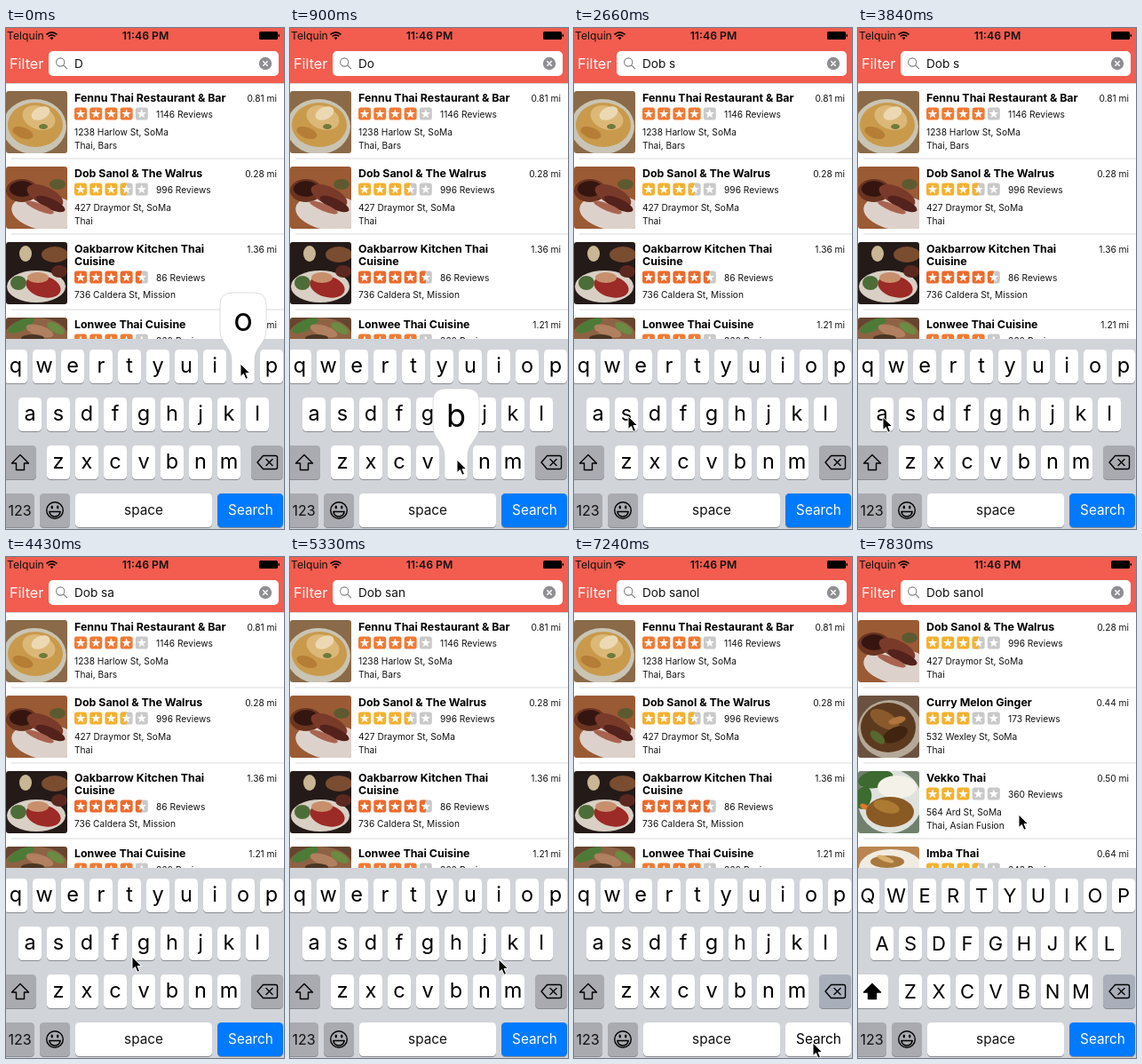
Recreate the animation shown at these times as an HTML page. Size 313 by 564 pixels, loop 8 s.

```html
<!DOCTYPE html>
<html lang="en">
<head>
<meta charset="utf-8">
<title>Restaurant search</title>
<style>
  html, body { margin: 0; width: 100%; height: 100%; overflow: hidden; background: #fff; }
  svg { display: block; }
  text { font-family: Inter, Roboto, "Liberation Sans", sans-serif; font-size: 10.2px; fill: #111; white-space: pre; }
  .mid { text-anchor: middle; }
  .end { text-anchor: end; }
  .name { font-size: 12.4px; font-weight: 700; fill: #000; }
  .lower { font-size: 23.5px; fill: #000; }
  .upper { font-size: 22px; fill: #000; }
  .big { font-size: 36px; fill: #000; }
  .label { font-size: 15.3px; }
  .key { fill: #fff; }
  .gray { fill: #a9abb0; }
  .line { fill: none; stroke: #000; stroke-width: 1.4; stroke-linejoin: round; stroke-linecap: round; }
</style>
</head>
<body>
<svg id="stage" width="313" height="564" viewBox="0 0 313 564"></svg>
<script>
const stage = document.getElementById('stage');
const $ = id => document.getElementById(id);

const text = (x, y, s, cls = '', more = '') =>
  `<text x="${x}" y="${y}" class="${cls}" ${more}>${s.replace('&', '&amp;')}</text>`;
const rect = (x, y, w, h, r, more = '') =>
  `<rect x="${x}" y="${y}" width="${w}" height="${h}" rx="${r}" ${more}/>`;
const oval = (fill, x, y, rx, ry, turn = 0) =>
  `<ellipse cx="${x}" cy="${y}" rx="${rx}" ry="${ry}" fill="${fill}" transform="rotate(${turn} ${x} ${y})"/>`;

// Dishes: table colour followed by a few ovals
const dishes = {
  soup: ['#8a6a48', ['#c9c4b4', 32, 40, 36, 31], ['#c99a4c', 33, 38, 31, 25], ['#dcb878', 37, 30, 19, 13, 20],
    ['#ecd9b4', 39, 25, 11, 7, -25], ['#b57d35', 19, 47, 12, 6, 20], ['#6f7a3c', 42, 40, 5, 3]],
  beef: ['#9a5a34', ['#ddd2cb', 46, 52, 40, 20, 8], ['#6a3421', 18, 27, 18, 13], ['#351510', 18, 25, 14, 9],
    ['#7a3a2a', 44, 33, 22, 10, 25], ['#54221c', 50, 42, 18, 6, 25], ['#a86450', 38, 46, 17, 4, 22], ['#5d5a30', 58, 20, 9, 6]],
  feast: ['#241a18', ['#7a4c30', 55, 14, 15, 9], ['#c8b694', 22, 13, 7, 9], ['#d9cfc4', 34, 50, 33, 18],
    ['#9c2a26', 42, 50, 20, 12, 15], ['#c88f6c', 36, 40, 12, 6], ['#4d6d38', 14, 46, 9, 8], ['#5b2820', 60, 33, 9, 7]],
  greens: ['#66442f', ['#8e6244', 34, 22, 36, 22], ['#4d7a37', 17, 9, 16, 6, -25], ['#b08060', 38, 15, 16, 6, 18],
    ['#6b8a42', 56, 12, 11, 5, 30], ['#4b3523', 30, 23, 13, 4]],
  noodles: ['#6b5240', ['#b5a898', 36, 38, 36, 33], ['#5c3a20', 34, 36, 31, 28], ['#8a5a2c', 30, 27, 18, 9, 30],
    ['#40240f', 42, 44, 15, 8, -25], ['#56682f', 22, 47, 10, 5, 40], ['#b0743c', 44, 28, 10, 4, -15]],
  rice: ['#71806c', ['#dfe1dd', 36, 34, 36, 36], ['#3c6a30', 20, 9, 20, 10, -10], ['#f3f1e8', 44, 18, 22, 13],
    ['#3c6a30', 6, 30, 9, 13, 15], ['#d9792c', 7, 40, 5, 3, 25], ['#8a5a24', 36, 46, 27, 17], ['#ad7a34', 32, 40, 15, 7, 15]],
  plate: ['#b98450', ['#f1ece2', 37, 24, 36, 21], ['#a8783e', 33, 17, 19, 7], ['#d9b070', 31, 14, 10, 3, 20]]
};

const photo = (dish, y) => {
  const [table, ...parts] = dishes[dish];
  return `<g transform="translate(0 ${y})" clip-path="url(#photo)">` +
    rect(0, 0, 69, 70, 0, `fill="${table}"`) + parts.map(p => oval(...p)).join('') + '</g>';
};

const starPoints = Array.from({ length: 10 }, (_, i) => {
  const a = i * Math.PI / 5, r = i % 2 ? 2.3 : 5.5;
  return (r * Math.sin(a)).toFixed(2) + ',' + (-r * Math.cos(a)).toFixed(2);
}).join(' ');

const stars = (rating, y) => {
  const color = rating > 4 ? '#ed6a2c' : rating > 3.5 ? '#f07a34' : '#f4b130';
  let out = '';
  for (let i = 0; i < 5; i++) {
    const x = 77 + 17.2 * i, full = rating >= i + 1;
    out += rect(x, y, 14, 14, 2.8, `fill="${full ? color : '#c9c9c9'}"`);
    if (!full && rating > i)
      out += `<path d="M${x + 7} ${y}h-4.2q-2.800 0-2.800 2.800v8.400q0 2.800 2.800 2.800h4.200z" fill="${color}"/>`;
    out += `<polygon points="${starPoints}" fill="#fff" transform="translate(${x + 7} ${y + 7.3})"/>`;
  }
  return out;
};

const row = ([dish, name, miles, rating, reviews, street, kind], i) => {
  const top = 62 + 85 * i, lines = name.split('|'), shift = lines.length > 1 ? 14 : 0;
  return photo(dish, top + 9) +
    lines.map((s, n) => text(77, top + 20.5 + 14 * n, s, 'name')).join('') +
    text(305, top + 20.5, miles + ' mi', 'end') +
    stars(rating, top + 27.5 + shift) +
    text(169, top + 39 + shift, reviews + ' Reviews') +
    text(77, top + 58.5 + shift * 0.93, street) +
    (shift ? '' : text(77, top + 73.5, kind)) +
    rect(6, top + 84.5, 307, 1, 0, 'fill="#d9d9dc"');
};

const walrus = ['beef', 'Dob Sanol & The Walrus', '0.28', 3.5, 996, '427 Draymor St, SoMa', 'Thai'];
const before = [
  ['soup', 'Fennu Thai Restaurant & Bar', '0.81', 4, 1146, '1238 Harlow St, SoMa', 'Thai, Bars'],
  walrus,
  ['feast', 'Oakbarrow Kitchen Thai|Cuisine', '1.36', 4.5, 86, '736 Caldera St, Mission', ''],
  ['greens', 'Lonwee Thai Cuisine', '1.21', 4, 360, '', '']
];
const after = [
  walrus,
  ['noodles', 'Curry Melon Ginger', '0.44', 3, 173, '532 Wexley St, SoMa', 'Thai'],
  ['rice', 'Vekko Thai', '0.50', 3, 360, '564 Ard St, SoMa', 'Thai, Asian Fusion'],
  ['plate', 'Imba Thai', '0.64', 3.5, 343, '', '']
];

// Keyboard
const keys = {};
['qwertyuiop', 'asdfghjkl', 'zxcvbnm'].forEach((letters, r) =>
  [...letters].forEach((c, i) => keys[c] = { x: [11, 27, 59][r] + 32 * i, y: 362 + 54 * r }));

const cap = (x, y, w, cls, id = '') =>
  rect(x, y + 1, w, 38, 4.5, 'fill="#888b90"') + rect(x, y, w, 38, 4.5, `class="${cls}" id="${id}"`);
const letters = upper => Object.entries(keys).map(([c, k]) =>
  text(k.x, k.y + (upper ? 27 : 26), upper ? c.toUpperCase() : c, 'mid ' + (upper ? 'upper' : 'lower'))).join('');

const keyboard = rect(0, 350, 313, 214, 0, 'fill="#d1d4d9"') +
  Object.values(keys).map(k => cap(k.x - 13, k.y, 26, 'key')).join('') +
  cap(-6, 470, 40, 'gray', 'shift') + cap(276, 470, 36, 'gray', 'erase') +
  cap(-6, 524, 38, 'gray') + cap(38, 524, 34, 'gray') +
  cap(78, 524, 154, 'key', 'space') + cap(238, 524, 74, 'key', 'search') +
  `<g id="lower">${letters(false)}</g><g id="upper">${letters(true)}</g>` +
  '<path id="arrow" class="line" d="M16 480.5l9.5 9.5h-5v7.500h-9v-7.500h-5z"/>' +
  '<path class="line" d="M283 489l6.500-7.500h14q2 0 2 2v11q0 2-2 2h-14zM293 485.500l7 7m0-7l-7 7"/>' +
  '<circle class="line" cx="55" cy="543" r="9.300"/><path class="line" d="M48.800 544.500h12.400q-1 5.500-6.200 5.500t-6.200-5.500z"/>' +
  oval('#000', 51.8, 539.5, 1.2, 1.9) + oval('#000', 58.2, 539.5, 1.2, 1.9) +
  text(15.5, 549, '123', 'mid', 'style="font-size:16px"') +
  text(155, 547.5, 'space', 'mid label') + text(275.5, 547.5, 'Search', 'mid label', 'id="go"');

const header = rect(0, 0, 313, 62, 0, 'fill="#f25d4f"') + rect(0, 62, 313, 0.5, 0, 'fill-opacity="0.3"') +
  text(1, 12.8, 'Telquin', '', 'style="font-size:12.200px"') +
  '<path class="line" style="stroke-linecap:butt;stroke-width:1.600" d="M45.500 7.300q6-5 12 0M47.600 9.500q3.900-3.200 7.800 0"/>' +
  '<path d="M49.500 11q2-1.500 4 0l-2 2.200z"/>' +
  text(157, 12.8, '11:46 PM', 'mid', 'style="font-size:12.300px;font-weight:600"') +
  rect(285, 4, 21, 9, 1.5) + rect(306.5, 7, 1.5, 3, 0.7) +
  text(4, 46, 'Filter', '', 'style="font-size:16.200px;fill:#fff"') +
  rect(48, 26, 259, 28, 5, 'fill="#fff"') +
  '<path d="M64.800 42l4.200 4.200M65.800 38.500a4.600 4.600 0 1 1-9.200 0a4.600 4.600 0 1 1 9.200 0z" fill="none" stroke="#808085" stroke-width="1.100"/>' +
  text(77, 45, '', '', 'id="query" style="font-size:13.600px"') +
  '<circle cx="292" cy="40" r="7.200" fill="#8e8e93"/><path d="M289.300 37.300l5.400 5.400m0-5.400l-5.400 5.400" stroke="#fff" stroke-width="1.400"/>';

const bubble = '<g id="bubble"><path d="M-26-50q0-14 14-14h24q14 0 14 14v28c0 16-13 18-13 34v22q0 4-4 4h-18q-4 0-4-4v-22c0-16-13-18-13-34z" ' +
  'fill="#fff" stroke="#c4c6ca" stroke-width="0.600"/>' + text(0, -21, '', 'mid big', 'id="glyph"') + '</g>';

const cursor = '<path id="cursor" d="M0 0V14.500l3.400-3.100 2.500 5.900 2.600-1.100-2.500-5.700h4.700z" stroke="#fff" stroke-width="1" stroke-linejoin="round"/>';

stage.innerHTML = `<defs><clipPath id="photo">${rect(0, 0, 69, 70, 3)}</clipPath></defs>` +
  rect(0, 0, 313, 564, 0, 'fill="#fff"') +
  `<g id="before">${before.map(row).join('')}</g><g id="after">${after.map(row).join('')}</g>` +
  keyboard + header + bubble + cursor;

// Timing, counted in screen ticks
const LOOP = 8000, TICK = 147.8, LAST = 53, RESULTS = 52, SEARCH = 49;
const query = 'Dob sanol';
const presses = [0, 6, 10, 17, 27, 34, 39, 43];
const path = [
  [0, 264, 378], [2, 260, 386], [5, 189, 484], [7, 187, 488], [10, 168, 537], [12, 168, 537],
  [16, 61, 437], [24, 61, 437], [26, 28, 438], [28, 30, 438], [30, 142, 450], [32, 206, 479],
  [33, 217, 487], [35, 219, 488], [36, 235, 453], [38, 264, 383], [40, 266, 383], [42, 280, 433],
  [44, 281, 437], [48, 269, 547], [51, 269, 547], [53, 181, 290]
];

function cursorAt(k) {
  const i = Math.max(1, path.findIndex(p => p[0] >= k));
  const [a, x, y] = path[i - 1], [b, u, v] = path[i], f = (k - a) / (b - a);
  return [Math.round(x + (u - x) * f), Math.round(y + (v - y) * f)];
}

const show = (id, on) => $(id).style.display = on ? '' : 'none';
const fill = (id, color) => $(id).style.fill = color;

function draw(k) {
  const pressed = query[presses.indexOf(k) + 1], key = presses.includes(k) && keys[pressed];
  const done = k >= RESULTS, late = k >= SEARCH;
  $('query').textContent = query.slice(0, 1 + presses.filter(p => p < k).length);
  $('cursor').setAttribute('transform', `translate(${cursorAt(k)})`);
  show('bubble', key);
  if (key) {
    $('bubble').setAttribute('transform', `translate(${key.x} ${key.y})`);
    $('glyph').textContent = pressed;
  }
  show('before', !done);
  show('after', done);
  show('lower', !done);
  show('upper', done);
  fill('shift', done ? '#fff' : '');
  fill('arrow', done ? '#000' : '');
  fill('erase', late ? '#a9afba' : '');
  fill('space', presses.includes(k) && pressed === ' ' ? '#abb0ba' : '');
  fill('search', k === SEARCH ? '#fff' : '#007aff');
  fill('go', k === SEARCH ? '#000' : '#fff');
}

const start = performance.now();
let shown = -1;
function loop() {
  const t = (performance.now() - start) % LOOP;
  const k = Math.min(LAST, Math.floor((t + 8) / TICK));
  if (k !== shown) draw(shown = k);
  requestAnimationFrame(loop);
}
loop();
</script>
</body>
</html>
```
